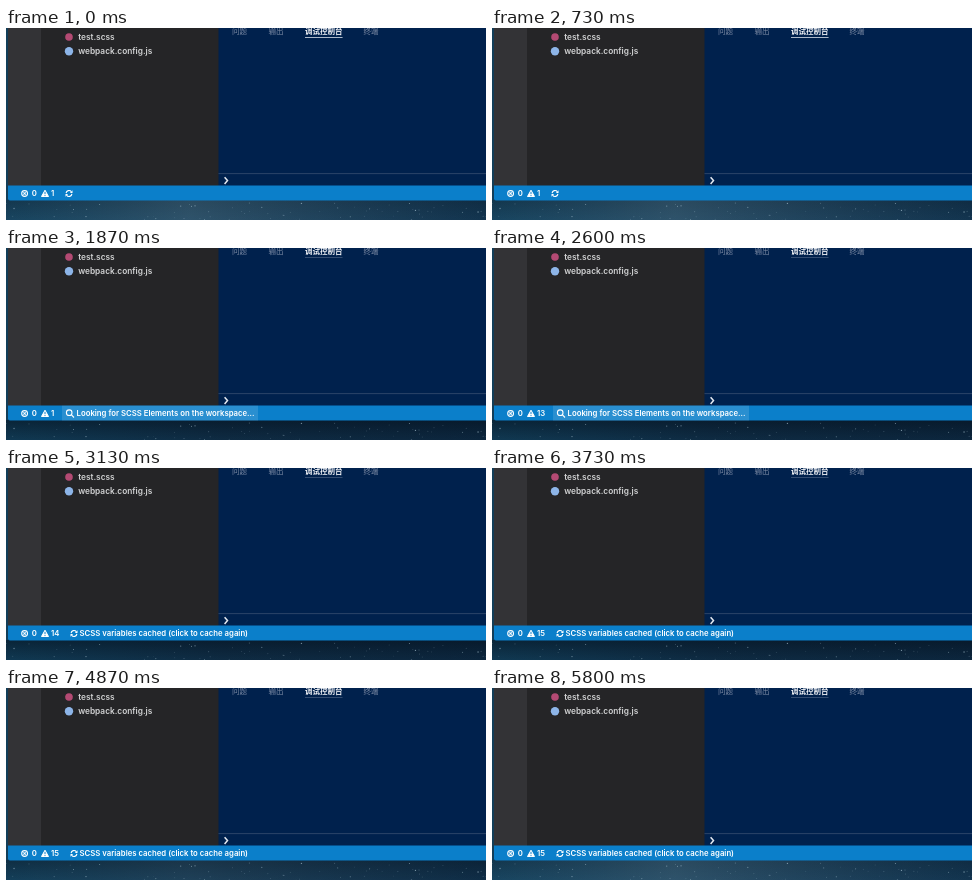
An HTML page that plays this animation: 480 px wide and 192 px high, repeating every 5.87 s.

```html
<!DOCTYPE html>
<html lang="zh">
<head>
<meta charset="utf-8">
<title>Status bar</title>
<style>
html, body { margin: 0; width: 100%; height: 100%; overflow: hidden; background: #0b2136; }
svg { display: block; width: 480px; height: 192px; }
text { font-family: Inter, "Open Sans", sans-serif; white-space: pre; }
.files { font-size: 8.3px; font-weight: 600; fill: #d2d3d4; }
.tabs text { font-family: "Noto Sans CJK SC", "Noto Sans CJK", "Noto Sans CJK JP", sans-serif; font-size: 7.5px; font-weight: 500; fill: #7c8ba5; }
.tabs .active { fill: #f3f5f8; font-weight: 700; }
.bar { font-size: 7.75px; font-weight: 600; fill: #fff; }
.line { fill: none; stroke: #fff; stroke-width: 1.1; }

.step { visibility: hidden; animation: 5870ms step-end infinite; }
.caret { animation-name: caret; }
.before { animation-name: before; }
.search { animation-name: search; }
.done { animation-name: done; }
.n1 { animation-name: n1; }
.n13 { animation-name: n13; }
.n14 { animation-name: n14; }
.n15 { animation-name: n15; }
.shift { animation: shift 5870ms step-end infinite; }
.glow { animation: glow 5870ms linear infinite; }
@keyframes caret { 0%, 9.7%, 25%, 100% { visibility: hidden } 1.1%, 18.1% { visibility: visible } }
@keyframes before { 0% { visibility: visible } 25%, 100% { visibility: hidden } }
@keyframes search { 0%, 48.8%, 100% { visibility: hidden } 25% { visibility: visible } }
@keyframes done { 0% { visibility: hidden } 48.8%, 100% { visibility: visible } }
@keyframes n1 { 0% { visibility: visible } 38.6%, 100% { visibility: hidden } }
@keyframes n13 { 0%, 48.8%, 100% { visibility: hidden } 38.6% { visibility: visible } }
@keyframes n14 { 0%, 59.1%, 100% { visibility: hidden } 48.8% { visibility: visible } }
@keyframes n15 { 0% { visibility: hidden } 59.1%, 100% { visibility: visible } }
@keyframes shift { 0% { transform: none } 38.6%, 100% { transform: translateX(5px) } }
@keyframes glow { 0%, 14.8%, 87.4%, 100% { opacity: 1 } 23.9%, 78.3% { opacity: 0 } }
</style>
</head>
<body>
<svg viewBox="0 0 480 192">
  <defs>
    <linearGradient id="sky">
      <stop offset="0" stop-color="#123e59"/>
      <stop offset=".45" stop-color="#102f48"/>
      <stop offset="1" stop-color="#0d2942"/>
    </linearGradient>
    <linearGradient id="shade" x2="0" y2="1">
      <stop offset="0" stop-color="#020b16" stop-opacity=".5"/>
      <stop offset="1" stop-color="#020b16" stop-opacity=".1"/>
    </linearGradient>
    <linearGradient id="haze">
      <stop offset="0" stop-color="#2c6382" stop-opacity=".3"/>
      <stop offset=".38" stop-color="#56829a" stop-opacity=".45"/>
      <stop offset="1" stop-color="#24587a" stop-opacity=".3"/>
    </linearGradient>
    <g id="sync">
      <path class="line" d="M-2.9 -.4A2.9 2.9 0 0 1 2.3 -1.8M2.9 .4A2.9 2.9 0 0 1 -2.3 1.8"/>
      <path fill="#fff" d="M3.5 -3.3V-.6H.9ZM-3.5 3.3V.6H-.9Z"/>
    </g>
  </defs>

  <rect width="480" height="192" fill="url(#sky)"/>
  <rect y="172" width="480" height="20" fill="url(#shade)"/>
  <rect class="glow" y="172" width="480" height="20" fill="url(#haze)"/>
  <g id="stars" fill="#c0d8e6"></g>

  <rect x="2" width="33" height="158" fill="#333336"/>
  <rect x="35" width="178" height="158" fill="#252527"/>
  <rect x="212.5" width="268" height="158" fill="#00214d"/>
  <path d="M212.5 145.6H480" stroke="#2b4468"/>

  <g class="files">
    <circle cx="63" cy="9" r="3.8" fill="#b44a73"/>
    <text x="72.2" y="12">test.scss</text>
    <circle cx="63" cy="23.2" r="4.2" fill="#8db5e8"/>
    <text x="72.2" y="26.3">webpack.config.js</text>
  </g>

  <g class="tabs">
    <text x="226" y="6.4">问题</text>
    <text x="262.5" y="6.4">输出</text>
    <text class="active" x="299" y="6.4">调试控制台</text>
    <text x="357.5" y="6.4">终端</text>
    <path d="M299 9.5H336.5" stroke="#40587c" stroke-width=".8"/>
    <path class="step before" d="M299 9.5H336.5" stroke="#b9c4d3" stroke-width=".9"/>
  </g>

  <path d="M218.6 149.2L221.5 152.6L218.6 156" fill="none" stroke="#e6ebf2" stroke-width="1.5"/>
  <rect class="step caret" x="226" y="147" width="1.4" height="11" fill="#fff"/>

  <g class="bar">
    <path fill="#0b7fca" d="M2 157.6H480V172.6H4Q2 172.6 2 170.6Z"/>
    <circle class="line" cx="18.6" cy="165.5" r="2.9"/>
    <path class="line" d="M17.4 164.3L19.8 166.7M19.8 164.3L17.4 166.7"/>
    <text x="25.8" y="168.3">0</text>
    <path d="M39 162.2L42.5 168.5H35.5Z" stroke="#fff" stroke-linejoin="round"/>
    <path d="M39 163.9V166.2M39 167.1V168.1" stroke="#0b7fca"/>
    <text class="step n1" x="45" y="168.3">1</text>
    <text class="step n13" x="45" y="168.3">13</text>
    <text class="step n14" x="45" y="168.3">14</text>
    <text class="step n15" x="45" y="168.3">15</text>

    <g class="shift">
      <g class="step before">
        <use href="#sync" x="63" y="165.5"/>
      </g>
      <g class="step search">
        <rect x="56" y="157.6" width="196" height="15" fill="#fff" opacity=".13"/>
        <circle class="line" cx="63.2" cy="164.7" r="2.8"/>
        <path class="line" d="M65.2 166.7L68 169.5"/>
        <text x="70.6" y="168.3">Looking for SCSS Elements on the workspace...</text>
      </g>
      <g class="step done">
        <use href="#sync" x="63" y="165.5"/>
        <text x="68.5" y="168.3">SCSS variables cached (click to cache again)</text>
      </g>
    </g>
  </g>
</svg>
<script>
let seed = 11;
const rand = () => (seed = seed * 16807 % 2147483647) / 2147483647;
const stars = document.getElementById("stars");
for (let i = 0; i < 75; i++) {
  const star = document.createElementNS(stars.namespaceURI, "circle");
  star.setAttribute("cx", rand() * 480);
  star.setAttribute("cy", 175 + rand() * 17);
  star.setAttribute("r", .3 + rand() * .4);
  star.setAttribute("opacity", .15 + rand() * .5);
  stars.append(star);
}
</script>
</body>
</html>
```
